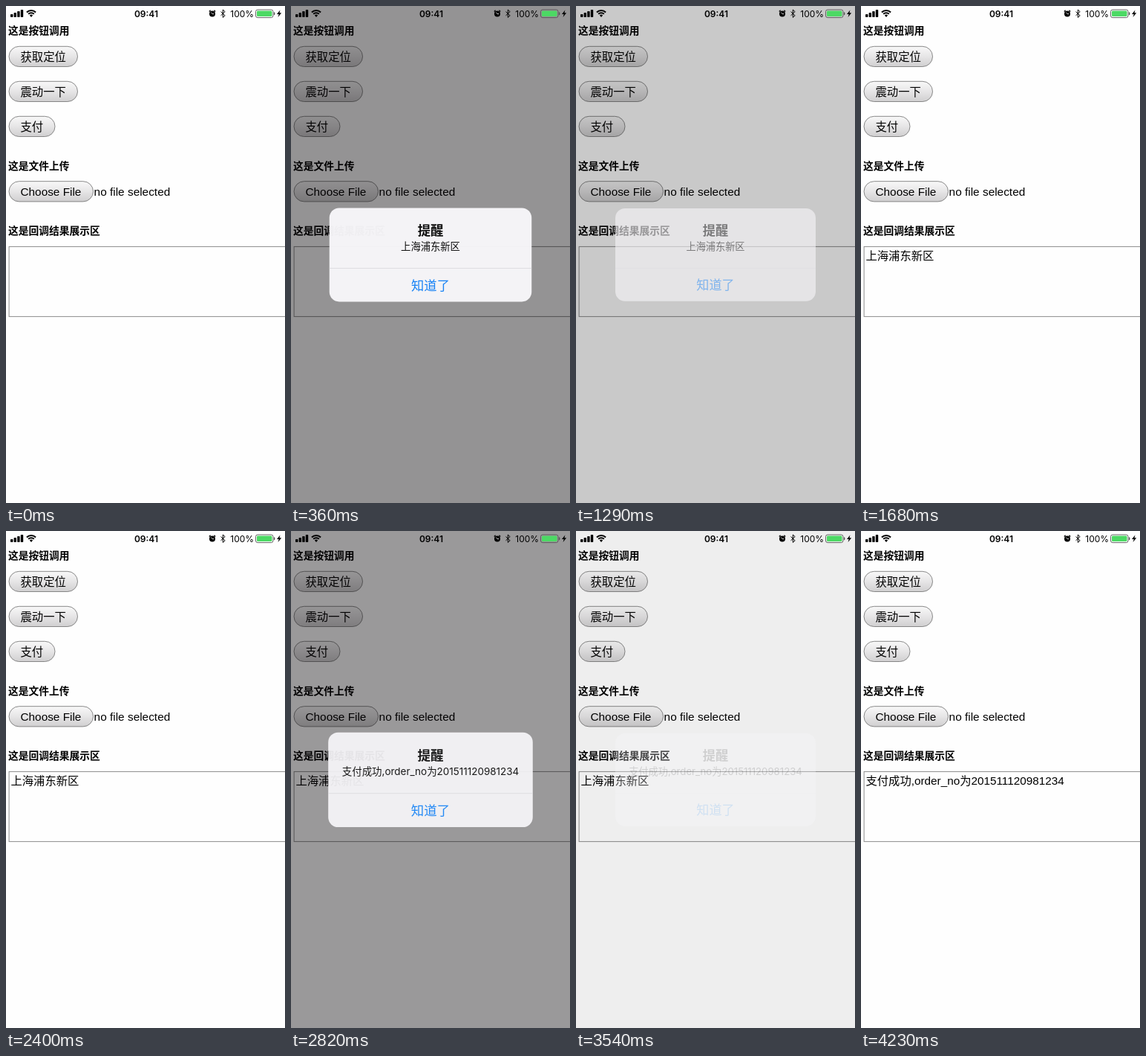
An HTML page with a canvas for the animation above (4260 ms loop, 376 by 668 pixels).

```html
<!DOCTYPE html>
<html lang="zh-CN">
<head>
<meta charset="utf-8">
<title>Alert demo</title>
<style>
  html, body { margin: 0; width: 100%; height: 100%; overflow: hidden; background: #fefefe; }
  canvas { display: block; width: 376px; height: 668px; }
</style>
</head>
<body>
<canvas id="stage"></canvas>
<script>
const W = 376, H = 668, LOOP = 4260;
const CJK = '"Noto Sans CJK SC", "Noto Sans CJK", sans-serif';
const PAGE = '"Liberation Sans", ' + CJK;
const UI = 'Inter, ' + CJK;

const alerts = [
  { open: 150, close: 1213, text: '上海浦东新区' },
  { open: 2653, close: 3390, text: '支付成功,order_no为201511120981234' }
];
const FADE = 404;

const canvas = document.getElementById('stage');
const ctx = canvas.getContext('2d');
const dpr = window.devicePixelRatio || 1;
canvas.width = W * dpr;
canvas.height = H * dpr;

// Critically damped spring: distance left after t ms
function rest(t) {
  if (t <= 0) return 1;
  const x = t * 0.02286;
  return x > 10 ? 0 : (1 + x) * Math.exp(-x);
}

function text(str, x, y, size, family, { weight = 400, color = '#000', align = 'left' } = {}) {
  ctx.font = `${weight} ${size}px ${family}`;
  ctx.fillStyle = color;
  ctx.textAlign = align;
  ctx.fillText(str, x, y);
}

function roundRect(x, y, w, h, r) {
  ctx.beginPath();
  ctx.roundRect(x, y, w, h, r);
}

function line(points, width, color = '#000') {
  ctx.beginPath();
  points.forEach(([x, y]) => ctx.lineTo(x, y));
  ctx.lineWidth = width;
  ctx.strokeStyle = color;
  ctx.stroke();
}

function button(label, y, w) {
  const fill = ctx.createLinearGradient(0, y, 0, y + 28);
  fill.addColorStop(0, '#f9f9f9');
  fill.addColorStop(0.5, '#e6e5e6');
  fill.addColorStop(1, '#cfcecf');
  roundRect(4, y + 0.3, w, 27.2, 13.6);
  ctx.fillStyle = fill;
  ctx.fill();
  ctx.lineWidth = 0.9;
  ctx.strokeStyle = '#7c7c7c';
  ctx.stroke();
  text(label, 19.5, y + 19.6, 15.35, PAGE);
}

function heading(label, y) {
  text(label, 3, y + 5, 13.75, PAGE, { weight: 700 });
}

function page(result) {
  ctx.fillStyle = '#fefefe';
  ctx.fillRect(0, 0, W, H);
  heading('这是按钮调用', 33);
  button('获取定位', 54, 92.5);
  button('震动一下', 101, 92.5);
  button('支付', 148, 62);
  heading('这是文件上传', 215);
  button('Choose File', 235.4, 113.5);
  text('no file selected', 118.6, 255, 15.4, PAGE);
  heading('这是回调结果展示区', 302.3);
  ctx.lineWidth = 1;
  ctx.strokeStyle = '#8c8c8c';
  ctx.strokeRect(4.1, 323.4, 380, 94);
  text(result, 6.5, 341, 15.3, PAGE);
}

function statusBar() {
  ctx.fillStyle = '#000';
  for (let i = 0; i < 4; i++) {
    const h = 4 + i * 2;
    roundRect(6 + i * 4.6, 15 - h, 3.4, h, 0.8);
    ctx.fill();
  }

  // wifi
  ctx.lineWidth = 2;
  ctx.strokeStyle = '#000';
  for (const r of [8.6, 5.4]) {
    ctx.beginPath();
    ctx.arc(34, 14.6, r, -Math.PI * 0.75, -Math.PI * 0.25);
    ctx.stroke();
  }
  ctx.beginPath();
  ctx.moveTo(34, 15);
  ctx.arc(34, 14.6, 3, -Math.PI * 0.75, -Math.PI * 0.25);
  ctx.fill();

  text('09:41', 189, 14.5, 12, UI, { weight: 600, align: 'center' });

  // alarm clock
  ctx.beginPath();
  ctx.arc(278, 10.5, 4, 0, Math.PI * 2);
  ctx.fill();
  line([[273.8, 7.4], [275.6, 5.8]], 1.3);
  line([[280.4, 5.8], [282.2, 7.4]], 1.3);
  line([[276.4, 8.6], [278, 10.6], [280.2, 10.6]], 0.8, '#fff');

  // bluetooth
  line([[289.5, 7.6], [295.2, 12.8], [292.3, 15.4], [292.3, 5], [295.2, 7.6], [289.5, 12.8]], 1);

  text('100%', 302.3, 14.5, 12, UI);

  // battery
  roundRect(336.5, 5, 23.5, 10.6, 2.6);
  ctx.lineWidth = 0.9;
  ctx.strokeStyle = '#555';
  ctx.stroke();
  roundRect(338, 6.5, 20.5, 7.6, 1.4);
  ctx.fillStyle = '#4cd964';
  ctx.fill();
  roundRect(361, 8.3, 1.4, 4, [0, 1.4, 1.4, 0]);
  ctx.fillStyle = '#555';
  ctx.fill();

  // charging bolt
  ctx.beginPath();
  [[369.4, 5.4], [365, 11], [367.7, 11], [366.6, 15], [371.2, 9.3], [368.5, 9.3]]
    .forEach(([x, y]) => ctx.lineTo(x, y));
  ctx.fillStyle = '#000';
  ctx.fill();
}

function dialog(message, alpha, scale) {
  ctx.save();
  ctx.translate(188, 334.5);
  ctx.scale(scale, scale);
  ctx.translate(-188, -334.5);
  // the frosted panel stays denser than its text while fading
  ctx.globalAlpha = alpha ** 0.65;
  roundRect(53, 272, 270, 124.8, 13);
  ctx.fillStyle = '#f7f6f9';
  ctx.fill();
  ctx.globalAlpha = alpha;
  ctx.fillStyle = '#d8d8dc';
  ctx.fillRect(53, 352, 270, 0.8);
  text('提醒', 188, 308.2, 17.2, UI, { weight: 600, align: 'center' });
  text(message, 188, 327.9, 13.2, UI, { align: 'center' });
  text('知道了', 188, 381.2, 17.1, UI, { weight: 500, color: '#0a7cf5', align: 'center' });
  ctx.restore();
}

function draw(t) {
  ctx.setTransform(dpr, 0, 0, dpr, 0, 0);
  const done = alerts.filter(a => t >= a.close + FADE).pop();
  const active = alerts.find(a => t > a.open && t < a.close + FADE);
  page(done ? done.text : '');
  if (active) {
    const entry = rest(t - active.open);
    const alpha = t < active.close ? 1 - entry : rest(t - active.close);
    ctx.fillStyle = `rgba(4, 0, 4, ${0.445 * alpha})`;
    ctx.fillRect(0, 0, W, H);
    dialog(active.text, alpha, 1 + 0.2 * entry);
  }
  statusBar();
}

const start = performance.now();
function tick() {
  draw((performance.now() - start) % LOOP);
  requestAnimationFrame(tick);
}
tick();
</script>
</body>
</html>
```
